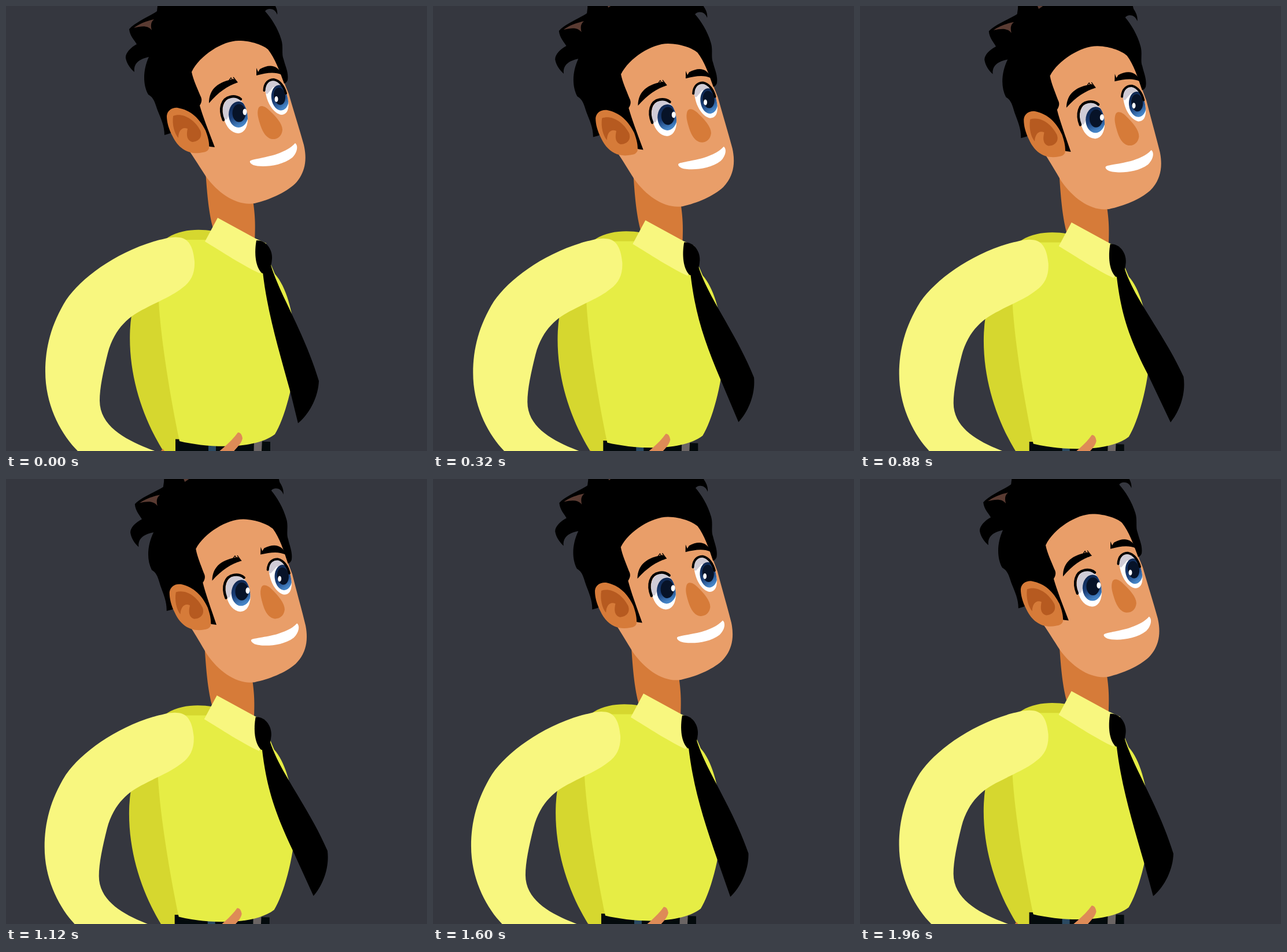
Animation of 728 by 769 pixels, one loop 2000 ms. Source, as an HTML page:

```html
<!DOCTYPE html>
<html lang="en">
<head>
<meta charset="utf-8">
<title>Breathing man</title>
<style>
html, body { margin: 0; width: 100%; height: 100%; overflow: hidden; background: #35373f; }
svg { display: block; width: 100vw; height: 100vh; }
.skin { fill: #e99e69; }
.shade { fill: #d67b39; }
.inner { fill: #b65a20; }
.shirt { fill: #e6ed45; }
.fold { fill: #d6d72f; }
.light { fill: #f8f77f; }
.white { fill: #fff; }
.grey { fill: #d0ccd6; }
.pupil { fill: #071328; }
.tuft { fill: #5a3b32; }
.lid { fill: none; stroke: #000; stroke-linecap: round; }
.hairs { fill: none; stroke: #000; stroke-width: 1.3; }
</style>
</head>
<body>
<svg viewBox="0 0 728 769">
  <defs>
    <linearGradient id="iris" x1="0" y1="0" x2=".35" y2="1">
      <stop offset="0" stop-color="#0c2146"/>
      <stop offset=".6" stop-color="#1b3f78"/>
      <stop offset="1" stop-color="#4584c6"/>
    </linearGradient>
    <path id="eyeL" d="M377 195C371 175 378 159 392 158C408 158 418 175 418 195C418 212 410 220 401 220C390 219 381 210 377 195Z"/>
    <path id="eyeR" d="M449 150C446 138 453 128 462 128C477 130 487 149 488.500 168C489 182 484 188 476 188C464 186 452 170 449 150Z"/>
    <clipPath id="clipL"><use href="#eyeL"/></clipPath>
    <clipPath id="clipR"><use href="#eyeR"/></clipPath>
  </defs>

  <g id="neck"><path class="shade" d="M345 285C348 330 351 358 358 384L430 410C431 385 432 365 426 330Z"/></g>

  <g id="head">
    <path class="skin" d="M318 252C325 262 335 278 346 295C368 325 400 346 430 341C455 335 483 323 500 307C515 291 522 270 515 240C506 208 497 180 489 152L478 125L455 50H330L305 105Z"/>
    <path d="M262 -20L262 0L261 9C250 17 223 28 213 40C214 52 223 60 226 66C215 72 206 82 207 90C209 100 215 108 222 114C221 104 224 93 247 88C237 110 236 135 246 153C255 158 257 165 262 180C268 195 274 207 274 223L284 220L300 205L330 228L352 243L361 244C350 215 340 190 335 172C338 167 340 162 336 155C330 140 324 128 321 114C335 85 375 60 402 60C425 60 445 68 453 75C465 90 473 112 481 134Q485 133 487 128C489 115 483 104 480 92C476 83 480 70 476 58C470 38 458 20 448 9C452 3 465 3 469 15C470 8 467 1 462 -6L458 -20Z"/>
    <path class="tuft" d="M221 38C230 31 242 26 256 23C250 28 250 34 252 42C246 34 236 34 221 38ZM295 -8L305 -6L298 -1Z"/>
    <path class="shade" d="M278 190C279 180 288 175 297 176C320 180 335 195 345 215C350 228 352 238 351 246Q349 252 340 253C318 258 299 248 288 225C281 212 278 200 278 190Z"/>
    <path class="inner" d="M289 190C305 184 325 195 336 215C340 225 335 234 322 235C312 232 312 222 314 212C305 208 298 215 298 228C291 220 287 205 289 190Z"/>
    <path d="M351 168C351 142 368 131 394 126L401 132C383 138 367 149 351 168Z"/>
    <path class="hairs" d="M386 128L389 124L396 134M393 123L400 132"/>
    <path d="M433 120L433 107L436 114L439 109C455 100 470 101 477 119C463 113 450 116 433 120Z"/>

    <use href="#eyeL" class="white"/>
    <g clip-path="url(#clipL)">
      <path class="grey" d="M370 197L382 196L390 178L422 168V150H370Z"/>
      <ellipse cx="402" cy="187.500" rx="17" ry="22.500" fill="url(#iris)"/>
      <ellipse class="pupil" cx="403" cy="185" rx="11.500" ry="15.500"/>
    </g>
    <ellipse class="white" cx="413" cy="183" rx="3.500" ry="5.500"/>
    <path class="lid" stroke-width="4.500" d="M376 197C368 178 373 160 388 157C396 155 403 158 406 161"/>

    <use href="#eyeR" class="white"/>
    <g clip-path="url(#clipR)">
      <path class="grey" d="M444 150L452 152L462 140L490 150V120H444Z"/>
      <ellipse cx="474" cy="158.500" rx="15" ry="22" transform="rotate(-8 474 159)" fill="url(#iris)"/>
      <ellipse class="pupil" cx="473" cy="156" rx="10" ry="15" transform="rotate(-8 473 156)"/>
    </g>
    <ellipse class="white" cx="467.500" cy="161" rx="3" ry="5"/>
    <path class="lid" stroke-width="4" d="M446.500 146C447 132 455 127 463 127C474 129 481 140 484 151"/>

    <path class="shade" d="M436 178C438 170 447 172 455 180C466 190 478 203 478 214C477 226 468 231 460 230C448 228 442 213 439 203C436 193 434 186 436 178Z"/>
    <path class="white" d="M422 268C424 265 440 264 465 257C482 251 492 246 500 237C505 240 505 252 495 262C475 278 440 279 428 275C423 273 421 270 422 268Z"/>
  </g>

  <g id="torso">
    <path class="fold" d="M358 389C336 385 304 385 280 400C250 420 218 490 214.500 560C211 640 238 715 272 769V790H302L330 500Z"/>
    <path class="shade" d="M268 790V769L271 765L274 769V790Z"/>
    <path fill="#030a0c" d="M293 748.500L457 753V790H293Z"/>
    <path fill="#2b4a62" d="M350 750H363V790H350Z"/>
    <path fill="#6b6564" d="M429 750L443 748L441 790H428Z"/>
    <path class="shirt" d="M305 404L350 404L400 410L449 425L465 463C488 489 500 543 501 600C499 650 481 715 465 740C430 767 350 764 300 752C285 680 268 580 264 510Z"/>
    <path fill="#de8b57" d="M362 775C378 762 392 750 401 737Q407 736 409 747C407 757 399 763 389 775Z"/>
  </g>

  <path id="collar" class="light" d="M344 407L366 366L432 402L450 410L448 440L439 462C412 450 372 424 344 407Z"/>

  <g id="tie">
    <path id="blade"/>
    <path d="M433 405C449 404 461 420 460 437Q459 449 455 459L443 462C431 452 429 426 433 405Z"/>
  </g>

  <path id="arm" class="light" d="M300 400C288 398 275 402 262 405C190 425 130 470 104 508C78 550 68 590 68 632C68 690 95 740 124 769L140 790H290L257 769C215 753 162 730 162 682C162 660 168 632 176 600C188 555 215 535 240 523C262 511 288 501 305 487C321 476 327 460 326 441C324 420 318 402 300 400Z"/>
</svg>
<script>
const $ = id => document.getElementById(id);
const LOOP = 2000, STEP = 40;
const times = [0, 320, 640, 1120, 1440, 1760, 1960, 2000];
const sway  = [0, 1.3, .7, -1.3, -2.2, -1.6, -.4, 0];
const drop  = [0, 4.8, 8, 9, 7.2, 3, .6, 0];
const tilt  = [0, .6, 1.4, 1.9, 1.7, .75, .1, 0];
const swing = [0, .66, 1, .84, .5, .19, .07, 0];

// Smooth curve through the keys, with a corner where the loop restarts
function at(keys, t) {
  const last = times.length - 1;
  let i = 0;
  while (i < last - 1 && t >= times[i + 1]) i++;
  const slope = k => {
    const a = Math.max(k - 1, 0), b = Math.min(k + 1, last);
    return (keys[b] - keys[a]) / (times[b] - times[a]);
  };
  const h = times[i + 1] - times[i], u = (t - times[i]) / h, v = 1 - u;
  return keys[i] * v * v * (1 + 2 * u) + keys[i + 1] * u * u * (3 - 2 * u)
    + h * u * v * (slope(i) * v - slope(i + 1) * u);
}

const move = (id, x, y, more = "") =>
  $(id).setAttribute("transform", `translate(${x} ${y}) ${more}`);

function bladePath(s) {
  const p = (x, y, dx, dy) => `${x + dx * s} ${y + dy * s} `;
  return "M444 460C452 530 " + p(472, 595, -5, -26) + p(492, 668, 6, -39)
    + "L" + p(505, 721, 33.3, -8)
    + "C" + p(525, 705, 28.5, -11) + p(540, 675, 25, -11) + p(541, 648, 19.3, -14)
    + "C" + p(516, 565, 11.5, -3) + p(474, 500, 1.5, 2) + "458 448Z";
}

function draw(now) {
  const t = Math.floor(now % LOOP / STEP) * STEP;
  const x = at(sway, t), y = at(drop, t);
  move("head", x, y, `rotate(${at(tilt, t)} 395 372)`);
  move("neck", x, y);
  move("collar", x, y * .9);
  move("tie", x, y * .7);
  move("torso", x, y * .5);
  move("arm", x, y * .47);
  $("blade").setAttribute("d", bladePath(at(swing, t)));
}

const start = performance.now();
function tick() {
  draw(performance.now() - start);
  requestAnimationFrame(tick);
}
tick();
</script>
</body>
</html>
```
